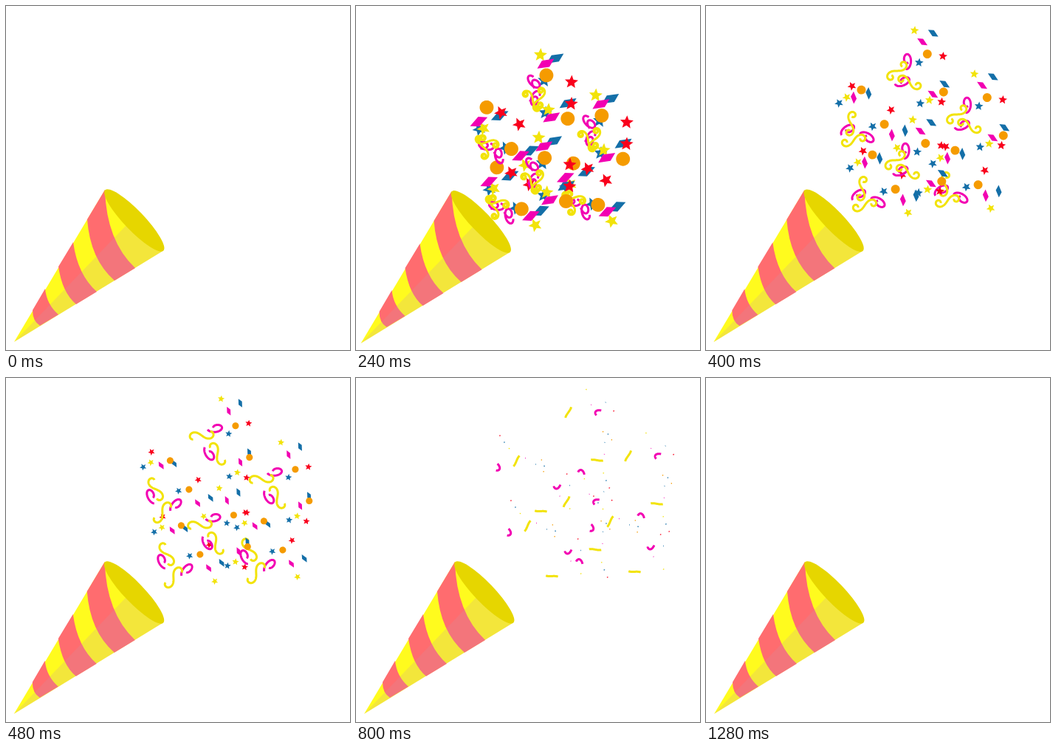
Recreate the animation shown at these times as an HTML page. Size 466 by 466 pixels, loop 1400 ms.

```html
<!DOCTYPE html>
<html lang="en">
<head>
<meta charset="utf-8">
<title>Party popper</title>
<style>
  html, body { margin: 0; width: 100%; height: 100%; overflow: hidden; background: #fff; }
  svg { display: block; width: 100%; height: 100%; }
</style>
</head>
<body>
<svg viewBox="0 0 466 466">
  <g id="cone">
    <path fill="#fffb1e" d="M11 455L134 249L213 331.5Z"/>
    <g fill="#ff6c6f">
      <path d="M134 249Q136 318 175 355L147 372Q114 343 110 289Z"/>
      <path d="M91 320Q97 364 123 387L95 404Q76 388 71 353Z"/>
      <path d="M53 383Q55 404 71 418L46 433Q36 427 36 412Z"/>
    </g>
    <path fill="#c896a6" fill-opacity=".21" d="M11 455L163 297L213 331.5Z"/>
    <ellipse rx="57" ry="13.5" fill="#e6d600" transform="translate(173.8 290.4) rotate(46.2)"/>
  </g>
  <g id="burst"></g>
</svg>
<script>
const LOOP = 1400, STEP = 40, START = 60, END = 1280, CURL_END = 1200;
const BLUE = '#146fa8', YELLOW = '#f2e30a', RED = '#f9001c', PINK = '#f200b2', ORANGE = '#f59b00';
const RAD = Math.PI / 180;

// Each piece flies through three points: at 160, 320 and 960 ms
const LAYERS = [
  { color: BLUE, shape: rhomb, paths: [[[255, 66], [295, 42], [343, 34]], [[271, 122], [313, 111], [337, 83]]] },
  { color: BLUE, shape: star, paths: [[[251, 91], [275, 79], [354, 77]], [[251, 132], [277, 131], [350, 141]]] },
  { color: YELLOW, shape: star, paths: [[[237, 54], [271, 39], [317, 12]], [[240, 125], [288, 127], [340, 129]]] },
  { color: RED, shape: star, paths: [[[290, 97], [312, 76], [355, 40]], [[290, 110], [311, 124], [348, 153]]] },
  { color: PINK, shape: rhomb, paths: [[[240, 66], [281, 53], [322, 34]], [[243, 152], [293, 127], [340, 101]]] },
  { color: ORANGE, shape: disc, paths: [[[238, 91], [285, 68], [340, 77]], [[276, 153], [311, 127], [350, 77]]] },
  { color: PINK, shape: coil, curl: true, paths: [[[232, 91], [260, 80], [343, 36]], [[238, 119], [258, 104], [317, 142]]] },
  { color: YELLOW, shape: scroll, curl: true, paths: [[[238, 125], [252, 99], [297, 35]], [[244, 119], [265, 106], [344, 119]]] }
];

// Slows down from 0 at 160 ms to 1 at 960 ms
const ease = (t, pace = 400) => (1 - Math.exp((160 - t) / pace)) / (1 - Math.exp(-800 / pace));

// Parabola through the three points
function place(t, [a, b, c], pace) {
  const e = ease(t, pace), m = ease(320, pace);
  const u = (e - m) * (e - 1) / m, v = e * (1 - e) / (m * (1 - m)), w = e * (e - m) / (1 - m);
  return [0, 1].map(i => a[i] * u + b[i] * v + c[i] * w);
}

const shrink = t => 11.5 * Math.max(0, 1 - (t - 160) / 860) ** 2;
const curlLeft = t => Math.max(0, (CURL_END - t) / 880);
const steps = (n, f) => Array.from({ length: n }, (_, i) => f(i));

function star(t) {
  const r = 0.95 * shrink(t) + 0.5;
  return { turn: t / 60, points: steps(10, i => {
    const q = i % 2 ? r * 0.45 : r, a = i * Math.PI / 5;
    return [q * Math.sin(a), -q * Math.cos(a)];
  }) };
}

function rhomb(t) {
  const r = 1.4 * shrink(t);
  return { turn: 0.4 * (t - 315), points: [[-r, 0], [-0.17 * r, -0.47 * r], [r, 0], [0.17 * r, 0.47 * r]] };
}

function disc(t) {
  const r = shrink(t);
  return { turn: 0, points: steps(36, i => [r * Math.cos(i * 10 * RAD), r * Math.sin(i * 10 * RAD)]) };
}

// Flat spring trimmed from both ends
function coil(t) {
  const half = 4 * curlLeft(t) ** 1.6;
  return { turn: 730 * ease(t) - 287, points: steps(49, i => {
    const d = half * (i / 24 - 1);
    return [1.3 * d - 8 * Math.cos(d), -4.8 * Math.sin(d)];
  }) };
}

// S-curve whose ends roll up, trimmed from both ends
function scroll(t) {
  const half = 40 * curlLeft(t) ** 2, step = half / 40;
  let x = 0, y = 0;
  const arm = steps(41, i => {
    const p = [x, y], a = -0.0055 * ((i + 0.5) * step) ** 2;
    x += step * Math.cos(a);
    y += step * Math.sin(a);
    return p;
  });
  const back = arm.slice(1).reverse().map(([px, py]) => [-px, -py]);
  return { turn: 15 + 315 * ease(t), points: [...back, ...arm] };
}

function outline({ points, turn }, [cx, cy], size) {
  const c = size * Math.cos(turn * RAD), s = size * Math.sin(turn * RAD);
  const mean = i => points.reduce((sum, p) => sum + p[i], 0) / points.length;
  const mx = mean(0), my = mean(1);
  return 'M' + points.map(([px, py]) => {
    const x = px - mx, y = py - my;
    return (cx + c * x - s * y).toFixed(2) + ' ' + (cy + s * x + c * y).toFixed(2);
  }).join('L');
}

const cone = document.getElementById('cone');
const burst = document.getElementById('burst');

function add(parent, tag, attrs) {
  const el = document.createElementNS(burst.namespaceURI, tag);
  for (const k in attrs) el.setAttribute(k, attrs[k]);
  return parent.appendChild(el);
}

// Three mirrored clusters and three plain ones
const FLIP = 'matrix(.546 -.838 -.838 -.546 132.4 446.9)';
const CLUSTERS = [
  [15, 88, FLIP], [0, 0, FLIP], [127, 82, FLIP],
  [-2.5, 121, ''], [81, 59, ''], [0, 0, '']
];

for (const layer of LAYERS) layer.nodes = [];
for (const [dx, dy, flip] of CLUSTERS) {
  const g = add(burst, 'g', { transform: `translate(${dx} ${dy}) ${flip}` });
  for (const { color, curl, nodes } of LAYERS) {
    nodes.push(add(g, 'path', curl
      ? { fill: 'none', stroke: color, 'stroke-linejoin': 'round' }
      : { fill: color }));
  }
}

function draw(t) {
  const x = t / 110, kick = 10 * (x * Math.exp(1 - x)) ** 2;
  cone.setAttribute('transform', `translate(${-kick} ${0.42 * kick})`);

  const live = t > START && t < END;
  burst.style.display = live ? '' : 'none';
  if (!live) return;

  // The burst opens out of the muzzle while its pieces keep their own size
  const open = 1 - (1 - Math.min(1, (t - START) / 248)) ** 2;
  burst.setAttribute('transform', `translate(170 318) scale(${open}) translate(-170 -318)`);
  burst.setAttribute('stroke-width', 3 / open);
  for (const { shape, curl, paths, nodes } of LAYERS) {
    const form = shape(t), tail = curl ? '' : 'Z';
    const d = paths.map((path, i) => {
      const turn = form.turn + (curl ? 65 * i : 0);
      return outline({ ...form, turn }, place(t, path, curl ? 900 : 400), 1 / open) + tail;
    }).join('');
    for (const node of nodes) node.setAttribute('d', d);
  }
}

let begin = null;
function tick(now) {
  if (begin === null) begin = now;
  const t = (now - begin) % LOOP;
  draw(Math.min(END, Math.floor(t / STEP) * STEP));
  requestAnimationFrame(tick);
}
draw(0);
requestAnimationFrame(tick);
</script>
</body>
</html>
```
